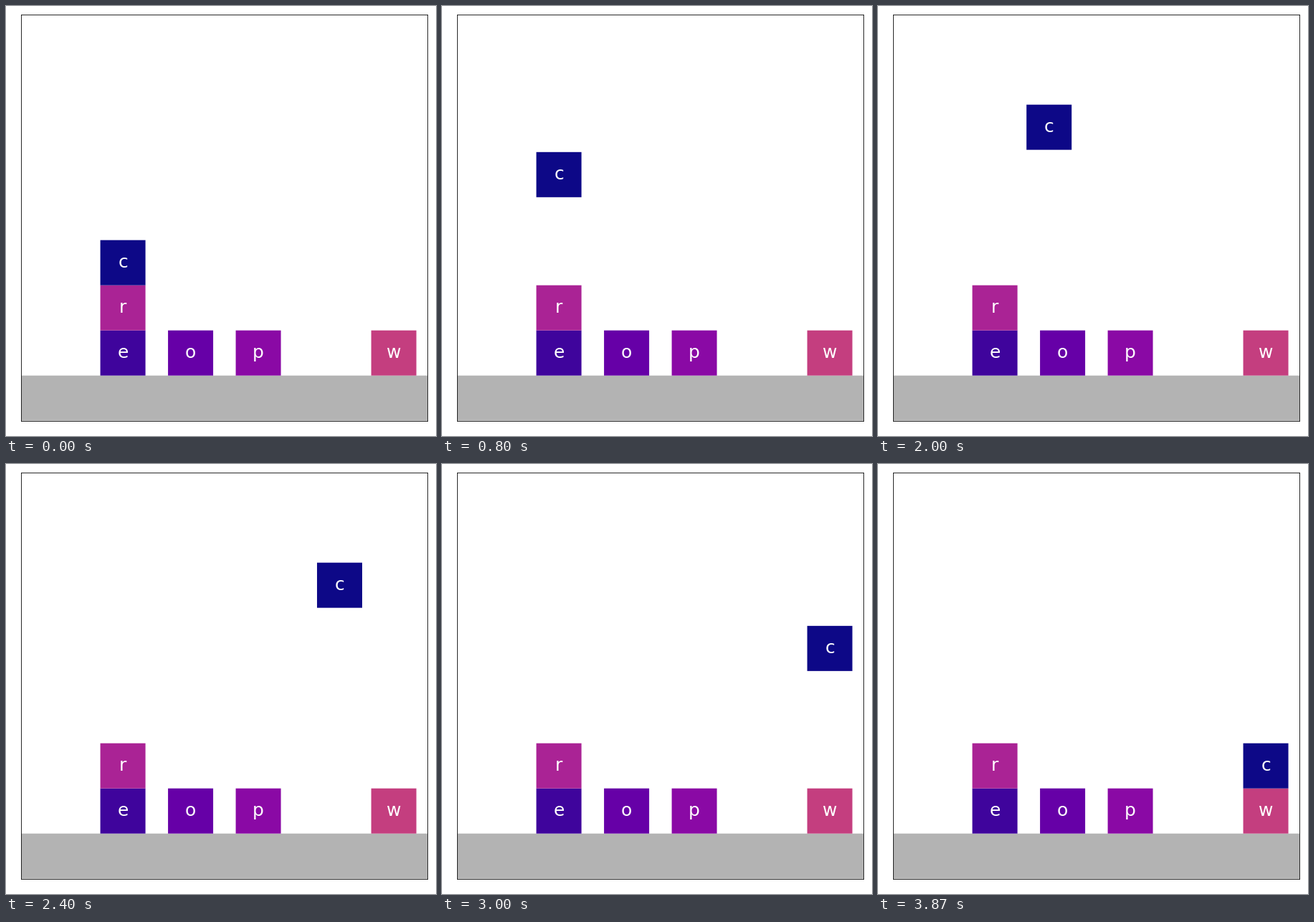
A matplotlib script that plays this animation: 600 by 600 pixels, repeating every 3.94 s.

```python
import matplotlib.pyplot as plt
from matplotlib.animation import FuncAnimation
from matplotlib.patches import Rectangle

SIZE, DPI = 600, 75
UNIT = 63                     # pixels per block
MARGIN = 21 + 1 / 3           # pixels left of and below the axes
LOOP, TICK = 3940, 10         # ms
POSES = 59
POSE_MS = 200 / 3

fig = plt.figure(figsize=(SIZE / DPI, SIZE / DPI), dpi=DPI, facecolor="white")
side = 9 * UNIT / SIZE
ax = fig.add_axes([MARGIN / SIZE, MARGIN / SIZE, side, side])
ax.set(xlim=(0, 9), ylim=(0, 9), xticks=[], yticks=[])
ax.add_patch(Rectangle((0, 0), 9, 1, color="0.7", lw=0, snap=False))


def add_block(letter, shade, x, y):
    color = plt.get_cmap("plasma")(shade)
    box = ax.add_patch(Rectangle((x, y), 1, 1, facecolor=color, lw=0, snap=False))
    label = ax.text(x + 0.5, y + 0.5, letter, color="white", fontsize=24,
                    family="DejaVu Sans", ha="center", va="center")
    return box, label


layout = [("e", 1.75, 1), ("o", 3.25, 1), ("p", 4.75, 1),
          ("r", 1.75, 2), ("w", 7.75, 1)]
for i, (letter, x, y) in enumerate(layout, start=1):
    add_block(letter, 24 * i, x, y)
box, label = add_block("c", 0, 1.75, 3)


def clamp(value, top):
    return max(0, min(value, top))


def position(pose):
    """Lift, wait, carry right, lower."""
    lift = clamp(pose + 1, 20) if pose > 0 else 0
    carry = clamp(pose - 28, 10) if pose > 29 else 0
    drop = clamp(pose - 38, 20)
    return 1.75 + 0.6 * carry, 3 + 0.15 * lift - 0.2 * drop


# Poses start at multiples of 1/15 s, rounded to the tick.
starts = [round(k * POSE_MS / TICK) for k in range(POSES)]


def update(tick):
    pose = sum(start <= tick for start in starts) - 1
    x, y = position(pose)
    box.set_xy((x, y))
    label.set_position((x + 0.5, y + 0.5))
    return box, label


anim = FuncAnimation(fig, update, frames=LOOP // TICK, interval=TICK,
                     repeat=True, repeat_delay=0, blit=False)
plt.show()
```
